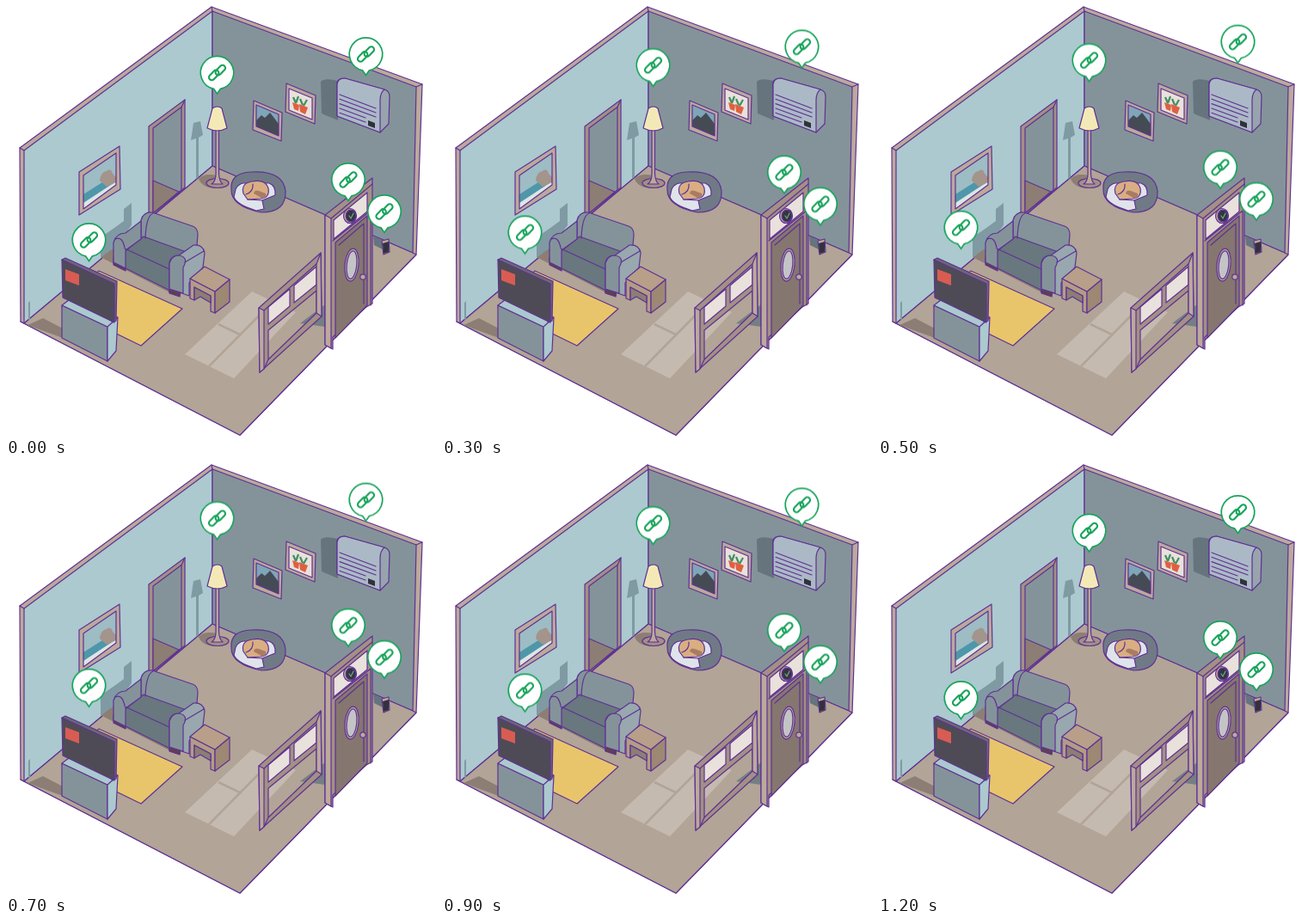
An HTML page for the animation above (1.3 s loop, 500 by 500 pixels).

```html
<!DOCTYPE html>
<html lang="en">
<head>
<meta charset="utf-8">
<title>Connected room</title>
<style>
html,body{margin:0;width:100%;height:100%;overflow:hidden;background:#fff}
svg{display:block;width:100vw;height:100vh}
.o{stroke:#5f3195;stroke-width:1.2;stroke-linejoin:round;stroke-linecap:round}
.n{fill:none}
.wood{fill:#a39085}
.pale{fill:#bba99c}
.grey{fill:#84939a}
.dim{fill:#69777f}
.light{fill:#abc9cf}
.shade{fill:#8c7e74}
.wallshade{fill:#7f9aa3}
.cream{fill:#e9e1db}
.floor{fill:#b2a496}
</style>
</head>
<body>
<svg viewBox="0 0 500 500">
  <!-- shell -->
  <g class="o">
    <path class="pale" d="M16 165 239 1 484 91 477 289 272 499 17 367Z"/>
    <path class="light" d="M21 168 240 6V186L21 369Z"/>
    <path class="grey" d="M240 6 477 94 473 287 240 186Z"/>
    <path class="floor" d="M17 367 21 369 240 186 473 287 477 289 272 499Z"/>
    <path class="n" d="M16 165 21 168M239 1 240 6M477 94 484 91"/>
  </g>

  <!-- cast shadows -->
  <path class="wallshade" d="M218 136 226 134 229 150 224 153V199L221 201V154L215 156ZM110 292V269L126 258 137 250V236L146 229V255L126 282ZM26 345 28 343V364L26 365Z"/>
  <path class="shade" d="M25 371 43 363 68 376 66 386ZM110 292 128 280 190 322V333ZM224 201Q230 194 245 197L246 212Q228 212 224 201Z"/>
  <path fill="#65747d" d="M366 88Q370 83 386 87V133L367 125ZM427 267 438 273V283L428 278Z"/>
  <path fill="#747f84" d="M342 369 371 347V373Z"/>

  <!-- sunlight -->
  <path fill="#c5bab0" d="M286 332 337 356 265 433 208 405Z"/>
  <path class="n" stroke="#b2a496" stroke-width="2.5" d="M247 370 272 382M310 344 236 419"/>

  <!-- doorway -->
  <g class="o">
    <path class="wood" d="M166 140 208 109V211L166 248Z"/>
    <path class="grey" d="M171 142 204 117.5V214L171 241Z"/>
    <path class="shade" d="M171 203 201 216 171 241Z"/>
    <path class="n" d="M204 117.5 208 109"/>
  </g>

  <!-- seascape -->
  <path class="pale o" d="M85 193 132 163 133 213 85 243Z"/>
  <path fill="#9dbcc3" d="M90 197 128 171V208L90 236Z"/>
  <path fill="#4e97ab" d="M90 219 112 205 128 203V208L90 236Z"/>
  <path fill="#dfe5e3" d="M90 229 128 204V208L90 236Z"/>
  <path fill="#a3948c" d="M109 203Q110 193 117 192 122 188 124 195L128 199V205L117 210Z"/>
  <path class="n o" d="M90 197 128 171V208L90 236Z"/>

  <!-- landscape and plant pictures -->
  <path class="pale o" d="M288 110 321 124 320 157 287 144Z"/>
  <path fill="#7fa5b8" d="M291 115 317 126V151L291 140Z"/>
  <path fill="#454b54" d="M291 133 297 127 301 130 307 124 317 137V151L291 140Z"/>
  <path class="n o" d="M291 115 317 126V151L291 140Z"/>
  <path class="pale o" d="M326 90 360 104 359 137 325 123Z"/>
  <path class="cream o" d="M329 96 356 107V132L329 121Z"/>
  <path fill="#df6040" d="M333 112 341 115 340 122 335 120ZM341 114 351 118 348 126 342 123Z"/>
  <path class="n" stroke="#3f8f62" stroke-width="2.2" d="M337 113 334 106M337 113 340 105M345 115 342 108M346 116 350 109"/>

  <!-- air unit -->
  <g class="o">
    <path fill="#97a4ad" d="M385 89Q386 84 394 84L440 97Q446 99 446 105L445 137 435 147 385 128Z"/>
    <path fill="#abb9c6" d="M385 128V91Q386 84 394 84L440 97Q435 101 435 110V147Z"/>
    <path class="n" d="M388 103 430 119M388 108.3 430 124M388 113.6 430 129M388 119 418 130M388 124.2 418 135"/>
    <path fill="#30313b" stroke="none" d="M421 133 429 136V142L421 139Z"/>
  </g>

  <!-- floor lamp -->
  <g class="o">
    <ellipse class="wood" cx="246" cy="206" rx="13" ry="5.5"/>
    <path class="pale" d="M244 144H247.5V195Q248 204 252 207H239Q244 204 244 195Z"/>
    <path fill="#f3e9b7" d="M240 119Q246 115 251 119L257 142Q246 148 234 142Z"/>
  </g>

  <!-- sleeping dog -->
  <g class="o">
    <path fill="#707a86" d="M262 214Q260 194 285 193 322 191 325 215 326 240 297 240 262 233 262 214Z"/>
    <path fill="#dfe3ea" d="M267 213Q270 207 276 206L306 206Q314 209 313 220L298 226 300 236 291 238Q268 231 265 222Z"/>
    <path fill="#d9ae82" d="M276 218Q273 206 286 204 302 201 305 212 307 223 296 224L281 225Z"/>
    <path fill="#a97c62" stroke="none" d="M288 218Q289 213 294 215L302 218Q304 223 297 223Z"/>
    <path class="n" d="M279 219Q288 216 287 207M281 225 298 226"/>
  </g>

  <!-- rug -->
  <path fill="#e8c56b" class="o" d="M108 308 205 352 157 395 65 350Z"/>

  <!-- sofa -->
  <g class="o">
    <path fill="#5d414c" d="M125 292 139 300V308L125 301ZM189 326 203 330 202 338 190 334Z"/>
    <path class="grey" d="M157 270V249Q160 239 170 240L217 256Q223 258 223 266L221 290 190 303Z"/>
    <path class="dim" d="M135 288 160 268 215 288 191 304V331L133 302Z"/>
    <path class="grey" d="M125 294V275Q128 264 139 264L157 250V271L139 284V305L125 298Z"/>
    <path class="n" d="M127 271Q135 267 138 281M138 282 190 306M171 241Q163 244 162 270"/>
    <path fill="#98a8ae" d="M190 329V299Q191 290 201 290L218 278Q229 277 231 287L229 304 213 322V337Z"/>
    <path class="grey" d="M190 329V299Q193 290 201 290 213 292 206 304V334Z"/>
    <path class="n" d="M208 298 230 285"/>
  </g>

  <!-- side table -->
  <g class="o">
    <path fill="#b39c86" d="M214 317 243 332V357L238 355V337L219 327V342L214 340Z"/>
    <path fill="#9d8874" d="M243 332 260 318V344L243 357Z"/>
    <path class="shade" d="M219 327 238 337V345L226 338 219 342Z"/>
    <path fill="#b79f89" d="M214 317 231 303 260 318 243 332Z"/>
  </g>

  <!-- television -->
  <g class="o">
    <path class="grey" d="M65 348 118 373V413L65 386Z"/>
    <path class="light" d="M65 348 77 339 130 362 118 373ZM118 373 130 362 128 401 118 413Z"/>
    <path fill="#6b6874" d="M65 295 69 293 129 320 128 366 124 368Z"/>
    <path fill="#4e4b57" d="M65 295 126 323V368L66 339Z"/>
    <path fill="#d95c53" stroke="none" d="M69 306 85 312V325L69 319Z"/>
  </g>

  <!-- front window -->
  <g class="o">
    <path class="wood" fill-rule="evenodd" d="M294 351 366 287 367 361 295 426ZM305 377V411L361 357V331Z"/>
    <path class="cream" d="M305 350 330 329V349L305 370ZM335 325 361 303V324L335 345Z"/>
    <path class="pale" d="M294 351 300 354V422L295 426ZM361 300 366 287 367 361 361 357Z"/>
    <path class="n" d="M300 354 361 300M300 422 305 411"/>
  </g>

  <!-- front door -->
  <g class="o">
    <path class="wood" d="M371 243 426 200V346L419 350 380 385V399L371 394Z"/>
    <path class="pale" d="M371 243 378 247V398L371 394Z"/>
    <path class="cream" d="M381 249 420 217V239L381 271Z"/>
    <path fill="#85766f" d="M383 275 420 244V348L383 386Z"/>
    <path class="n" d="M378 247 426 207M387 278 416 253V346M380 273 424 238V348"/>
    <g transform="rotate(6 402 301)">
      <ellipse class="pale" cx="402" cy="301" rx="8" ry="19"/>
      <ellipse fill="#c3c4c6" cx="402" cy="301" rx="5.8" ry="16.3"/>
    </g>
    <circle class="pale" cx="415" cy="315" r="3.2"/>
    <ellipse class="pale" cx="400" cy="244" rx="7.5" ry="8.5"/>
    <ellipse fill="#343640" cx="401" cy="244" rx="5.8" ry="6.8"/>
    <path class="n" style="stroke:#6fa98a" d="M399 244 401 247 404 241"/>
  </g>

  <!-- wall sensor -->
  <path class="pale o" d="M437 273 445 271 446 286 439 289Z"/>
  <path fill="#33313d" d="M438 276 445 274V286L439 288Z"/>

  <defs>
    <g id="pin" stroke="#18a45b">
      <path fill="#fff" stroke-width="1.7" d="M-4 18.8A19.2 19.2 0 1 1 4 18.8L0 24.6Z"/>
      <g class="n" stroke-width="2.1" transform="rotate(-46)">
        <rect x="-11.6" y="-4" width="13.6" height="6.6" rx="3.3"/>
        <rect x="-2" y="-2.6" width="13.6" height="6.6" rx="3.3"/>
      </g>
    </g>
  </defs>
  <g id="pins"></g>
</svg>
<script>
const FRAME = 100, COUNT = 13, PEAK = 6, RISE = 17.3;
// resting centres
const pins = [[245.5, 77.5], [418.5, 56], [398, 202], [440, 239], [96.5, 272]];
const layer = document.getElementById('pins');

layer.innerHTML = pins.map(([x, y]) => `<use href="#pin" x="${x}" y="${y}"/>`).join('');

// even steps up to the peak and back down
const bob = [];
for (let k = 0; k <= COUNT; k++) {
  const step = Math.max(0, Math.min(k, 2 * PEAK - k));
  bob.push({
    offset: k / COUNT,
    transform: `translateY(${-RISE * step / PEAK}px)`,
    easing: 'steps(1, end)'
  });
}
layer.animate(bob, { duration: FRAME * COUNT, iterations: Infinity });
</script>
</body>
</html>
```
